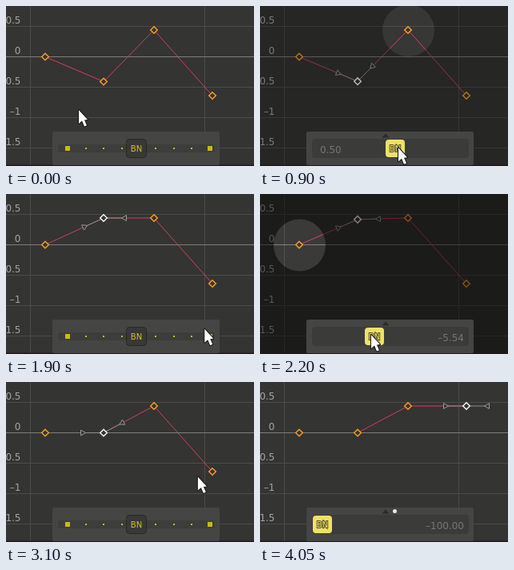
These frames come from a looping animation (310x200 px, 4.15 s). An HTML page with a canvas:

```html
<!DOCTYPE html>
<html>
<head>
<meta charset="utf-8">
<style>
html, body { margin: 0; width: 100%; height: 100%; overflow: hidden; background: #343432; }
canvas { display: block; }
</style>
</head>
<body>
<canvas id="stage" width="310" height="200"></canvas>
<script>
const ctx = document.getElementById('stage').getContext('2d');
const LOOP = 4150, STEP = 50;
const ZERO = 63.5, TOP = 30, LOW = 94.5, END = 112;
const MID = 163, REACH = 85, HANDLE = 26.5;

// Each drag: dim-in start, drag start and end, slider reset, side, neighbour key.
const drags = [
  { dim: 790, start: 853.69, end: 1100, fade: 1200, hide: 1150, reset: 1600, side: 1, near: 2 },
  { dim: 1950, start: 2121.67, end: 2350, fade: 2350, hide: 2400, reset: 2750, side: -1, near: 0 },
  { dim: 3400, start: 3600, end: 3850, fade: 3850, hide: 3900, reset: LOOP, side: -1, near: 2 }
];

// Cursor travel: start time, end time, x0, y0, x1, y1.
const moves = [
  [50, 350, 91, 130, 122, 95],
  [600, 850, 122, 95, 167, 178],
  [1850, 2100, 256, 168, 159, 176],
  [2750, 3200, 74, 177, 258, 112],
  [3350, 3600, 258, 112, 164, 173]
];

const clamp = v => Math.max(0, Math.min(1, v));
const span = (t, a, b) => clamp((t - a) / (b - a));
const ease = u => u < .5 ? 2 * u * u : 1 - 2 * (1 - u) ** 2;
const mix = (a, b, u) => a + (b - a) * u;
const pull = (d, t) => ease(span(t, d.start, d.end));

function path(points, closed) {
  ctx.beginPath();
  points.forEach(([x, y]) => ctx.lineTo(x, y));
  if (closed) ctx.closePath();
}

function line(points, color, width = 1) {
  path(points);
  ctx.strokeStyle = color;
  ctx.lineWidth = width;
  ctx.stroke();
}

function box(x, y, w, h, r, fill, stroke) {
  ctx.beginPath();
  ctx.roundRect(x, y, w, h, r);
  ctx.fillStyle = fill;
  ctx.fill();
  if (stroke) {
    ctx.strokeStyle = stroke;
    ctx.lineWidth = 1;
    ctx.stroke();
  }
}

function disc(x, y, r, fill) {
  ctx.beginPath();
  ctx.arc(x, y, r, 0, 7);
  ctx.fillStyle = fill;
  ctx.fill();
}

function text(str, x, y, color, align, size = 12) {
  ctx.font = size + 'px "DejaVu Sans", sans-serif';
  ctx.textAlign = align;
  ctx.fillStyle = color;
  ctx.fillText(str, x, y);
}

function grid() {
  ctx.fillStyle = '#343432';
  ctx.fillRect(0, 0, 310, 200);
  for (const x of [30.5, 248.5]) line([[x, 0], [x, 200]], '#4b4b49');
  ['0.5', '0', '–0.5', '–1', '–1.5'].forEach((label, i) => {
    const y = 25.5 + i * 38;
    if (i !== 1) line([[0, y], [310, y]], '#4b4b49');
    text(label, 18.5, y - 3.5, '#a3a39f', 'right');
  });
}

function handle([x, y], other) {
  const angle = Math.atan2(other[1] - y, other[0] - x);
  const tip = [x + HANDLE * Math.cos(angle), y + HANDLE * Math.sin(angle)];
  line([[x, y], tip], '#8e8e8b');
  path([0, 1, 2].map(i => {
    const a = angle + Math.PI + i * Math.PI * 2 / 3;
    return [tip[0] + 4 * Math.cos(a), tip[1] + 4 * Math.sin(a)];
  }), true);
  ctx.fillStyle = '#343432';
  ctx.fill();
  ctx.strokeStyle = '#999996';
  ctx.stroke();
}

function diamond([x, y], color) {
  path([[x, y - 4.3], [x + 4.3, y], [x, y + 4.3], [x - 4.3, y]], true);
  ctx.fillStyle = '#343432';
  ctx.fill();
  ctx.strokeStyle = color;
  ctx.lineWidth = 1.5;
  ctx.stroke();
}

function curve(keys, selected) {
  line(keys, '#d23f63');
  line([[0, ZERO], [310, ZERO]], '#7d7d7a');
  if (selected) {
    const key = keys[selected];
    handle(key, keys[selected - 1]);
    handle(key, keys[selected + 1] || [310, key[1]]);
  }
  keys.forEach((key, i) => diamond(key, i === selected ? '#f4f4f2' : '#f59d22'));
}

function spotlight([x, y], dim) {
  ctx.beginPath();
  ctx.rect(0, 0, 310, 200);
  ctx.arc(x + .5, y + .5, 32.5, 0, 7);
  ctx.fillStyle = `rgba(0,0,0,${.48 * dim})`;
  ctx.fill('evenodd');
  disc(x + .5, y + .5, 32.5, `rgba(255,255,255,${.03 * dim})`);
}

function slider(drag, t) {
  ctx.fillStyle = '#22191b';
  ctx.fillRect(0, 198.5, 310, 1.5);
  box(58, 157, 209, 42, 2, '#454543');
  const active = drag && t >= drag.dim;
  if (active) {
    path([[152.5, 164.5], [157, 159.5], [161.5, 164.5]], true);
    ctx.fillStyle = '#2b2b2a';
    ctx.fill();
    if (t >= drag.hide) disc(168.5, 161.5, 2.5, '#e6e6e4');
  }
  if (active && t > drag.start) {
    const amount = pull(drag, t);
    const value = (100 * amount * amount).toFixed(2);
    const x = MID + drag.side * REACH * amount;
    box(65, 166, 196, 24, 4, '#3b3b39');
    if (drag.side > 0) text(value, 75, 184, '#757573', 'left');
    else text('–' + value, 255, 184, '#757573', 'right');
    box(x + .0 - 12, 167, 24, 22, 4, '#efe166');
    ctx.font = '10px "DejaVu Sans", sans-serif';
    ctx.textAlign = 'center';
    ctx.strokeStyle = '#55502a';
    ctx.lineWidth = 2;
    ctx.strokeText('BN', x, 182);
    text('BN', x, 182, '#efe166', 'center', 10);
    return;
  }
  box(65, 173, 196, 10, 3, '#3d3d3b');
  ctx.fillStyle = '#c9b81c';
  for (const x of [74, 252]) ctx.fillRect(x, 175, 6, 6);
  for (const x of [100, 122, 145, 187, 210, 232]) ctx.fillRect(x - 1, 177, 2, 2);
  box(150.5, 166.5, 25, 23, 4, '#383837', '#272726');
  text('BN', MID, 182, '#d3c11e', 'center', 10);
}

function cursor(t) {
  if (drags.some(d => t >= d.hide && t < d.reset)) return;
  const [a, b, x0, y0, x1, y1] = moves.filter(m => t >= m[0]).pop() || moves[0];
  const u = ease(span(t, a, b));
  let x = mix(x0, x1, u), y = mix(y0, y1, u);
  if (t >= 1600 && t < 1850) [x, y] = [256, 168];
  const drag = drags.find(d => t > d.start && t < d.hide);
  if (drag) {
    x = MID + drag.side * (4 + REACH * pull(drag, t));
    if (drag.side > 0) y = mix(178, 168, pull(drag, t));
  }
  const shape = [[0, 0], [0, 17], [4, 13.5], [7, 20.5], [10, 19.2], [7, 12.5], [11, 12]];
  path(shape.map(([px, py]) => [x + px, y + py]), true);
  ctx.lineJoin = 'round';
  ctx.strokeStyle = '#151515';
  ctx.lineWidth = 2;
  ctx.stroke();
  ctx.fillStyle = '#fff';
  ctx.fill();
  ctx.lineJoin = 'miter';
}

function draw(t) {
  const blend = drags.map(d => pull(d, t) ** 2);
  const raised = mix(LOW, TOP, blend[0]);
  const keys = [
    [49, ZERO],
    [122, mix(raised, ZERO, blend[1])],
    [185, TOP],
    [258, mix(END, TOP, blend[2])]
  ];
  const selected = t < 350 ? 0 : t < 3200 ? 1 : 3;
  const drag = drags.find(d => t >= d.dim && t < d.reset);
  grid();
  curve(keys, selected || null);
  if (drag) {
    const dim = span(t, drag.dim, drag.dim + 200) * (1 - span(t, drag.fade, drag.fade + 200));
    if (dim > 0) spotlight(keys[drag.near], dim);
  }
  slider(drag, t);
  cursor(t);
}

function tick() {
  draw(Math.floor(performance.now() % LOOP / STEP) * STEP);
  requestAnimationFrame(tick);
}
tick();
</script>
</body>
</html>
```
